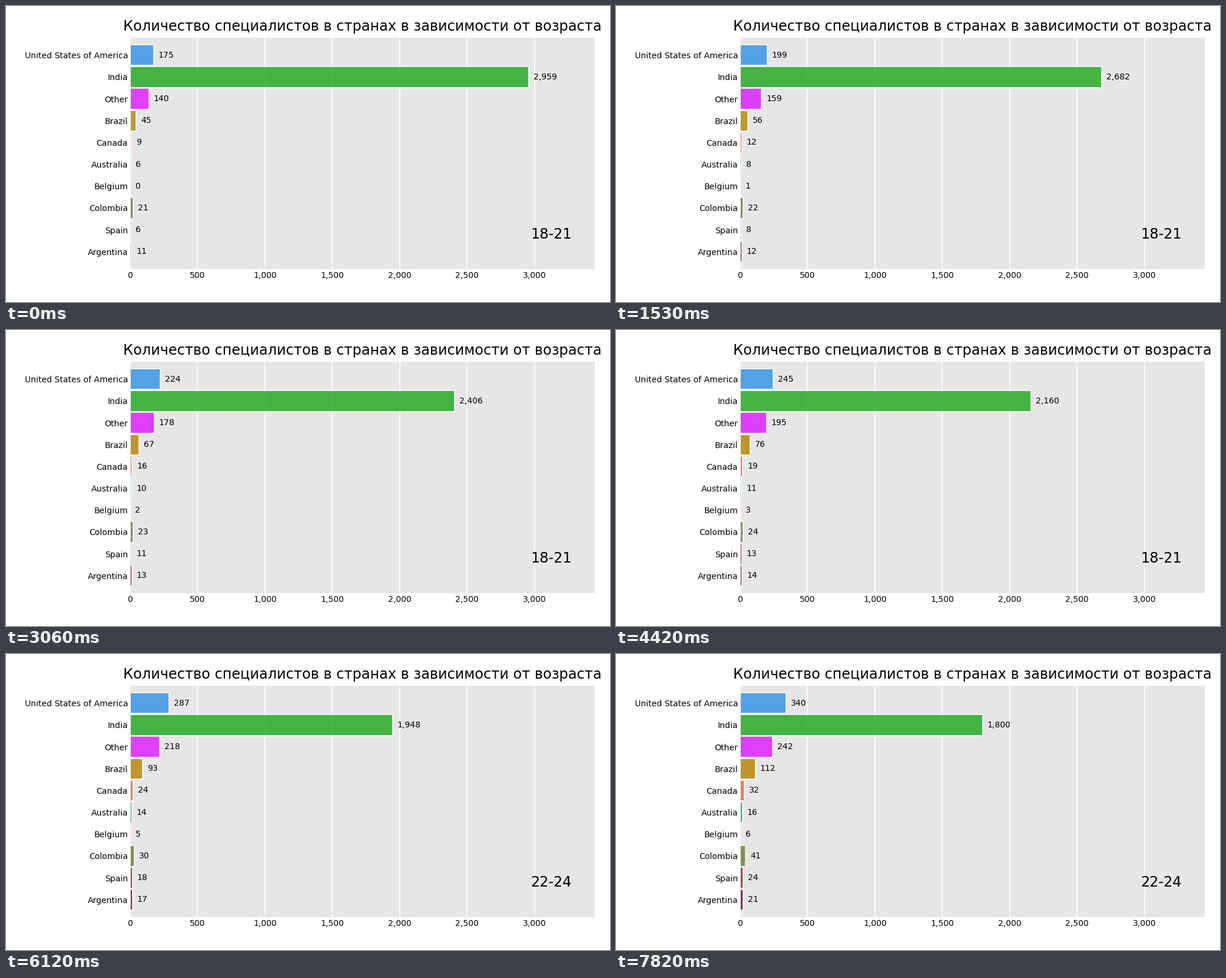
Animation of 1026 by 504 pixels, one loop 7990 ms. Source, as a matplotlib script:

```python
import matplotlib.pyplot as plt
import numpy as np
from matplotlib.animation import FuncAnimation
from matplotlib.ticker import MultipleLocator, StrMethodFormatter

WIDTH, HEIGHT, DPI = 1026, 504, 144
FRAMES, INTERVAL = 47, 170
STEPS = 30  # frames between two age groups
AGES = ["18-21", "22-24"]

# country, colour, value at the start of each age group (and the next one)
ROWS = [
    ("United States of America", "#2E91E5", 175, 256, 413),
    ("India", "#1CA71C", 2959, 2037, 1593),
    ("Other", "#DA16FF", 140, 204, 275),
    ("Brazil", "#B68100", 45, 81, 139),
    ("Canada", "#EB663B", 9, 20, 42),
    ("Australia", "#00A08B", 6, 12, 20),
    ("Belgium", "#FC0080", 0, 4, 7),
    ("Colombia", "#6C7C32", 21, 24, 55),
    ("Spain", "#862A16", 6, 14, 32),
    ("Argentina", "#620042", 11, 15, 26),
]
names, colors = zip(*(row[:2] for row in ROWS))
keys = np.array([row[2:] for row in ROWS], dtype=float)
slots = np.arange(len(ROWS), 0, -1)
x_max = keys.max() * 1.05 * 1.11

plt.rcParams["font.family"] = "DejaVu Sans"
fig = plt.figure(figsize=(WIDTH / DPI, HEIGHT / DPI), dpi=DPI, facecolor="white")
left, right, bottom, top = 210.9, 1000.35, 56, 450
ax = fig.add_axes([left / WIDTH, bottom / HEIGHT,
                   (right - left) / WIDTH, (top - bottom) / HEIGHT])
ax.set_facecolor(".9")
ax.set_axisbelow(True)
ax.grid(True, axis="x", color="white", linewidth=0.8)
ax.tick_params(length=0, labelsize=7, pad=2)
for spine in ax.spines.values():
    spine.set_visible(False)
ax.set_title("Количество специалистов в странах в зависимости от возраста",
             fontsize=12)

bars = ax.barh(slots, keys[:, 0], height=0.95, color=colors,
               edgecolor="white", linewidth=1, alpha=0.8)
ax.set_yticks(slots, names)
ax.xaxis.set_major_locator(MultipleLocator(500))
ax.xaxis.set_major_formatter(StrMethodFormatter("{x:,.0f}"))
ax.set_xlim(0, x_max)
ax.set_ylim(0.2, len(ROWS) + 0.8)

labels = [ax.text(0, y, "", ha="left", va="center", fontsize=7) for y in slots]
age = ax.text(0.95, 0.15, "", transform=ax.transAxes,
              ha="right", va="center", fontsize=12)


def update(frame):
    group, step = divmod(frame, STEPS)
    start, end = keys[:, group], keys[:, group + 1]
    values = start + (end - start) * step / STEPS
    for bar, label, value in zip(bars, labels, values):
        bar.set_width(value)
        label.set_x(value + 0.01 * x_max)
        label.set_text(f"{value:,.0f}")
    age.set_text(AGES[group])
    return [*bars, *labels, age]


anim = FuncAnimation(fig, update, frames=FRAMES, interval=INTERVAL,
                     repeat=True, repeat_delay=0, blit=False)
plt.show()
```
